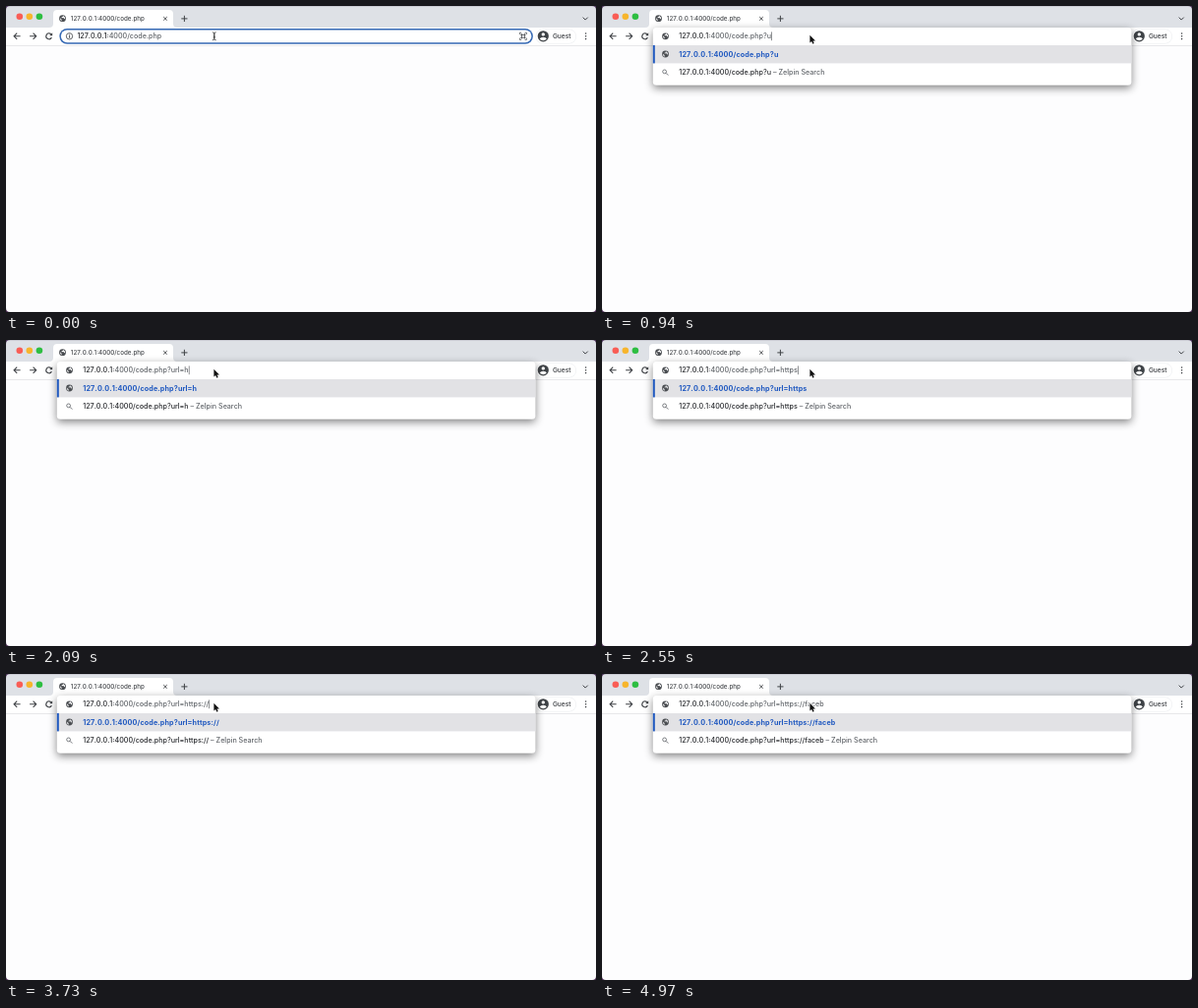
Recreate the animation shown at these times as an HTML page with a canvas. Size 600 by 312 pixels, loop 5 s.

```html
<!DOCTYPE html>
<html lang="en">
<head>
<meta charset="utf-8">
<title>Address bar typing</title>
<style>
html, body { margin: 0; width: 100%; height: 100%; overflow: hidden; background: #fdfdfe; }
canvas { display: block; width: 600px; height: 312px; }
</style>
</head>
<body>
<canvas id="stage"></canvas>
<script>
const canvas = document.getElementById('stage');
const ratio = window.devicePixelRatio || 1;
canvas.width = 600 * ratio;
canvas.height = 312 * ratio;
const ctx = canvas.getContext('2d');
ctx.fontKerning = 'none';

const LOOP = 5000;
const HOST = '127.0.0.1';
const PATH = ':4000/code.php';
const TYPED = '?url=https://faceb';
const KEYS = [650, 880, 1200, 1400, 1750, 1930, 2110, 2280, 2390, 2490, 2960,
  3450, 3610, 3880, 3970, 4060, 4200, 4340];
const INK = '#3f4246', DARK = '#26282c', GREY = '#5f6368', BLUE = '#2059c0';

function font(size, weight = 500, spacing = 0) {
  ctx.font = `${weight} ${size}px Inter, Roboto, sans-serif`;
  ctx.letterSpacing = spacing + 'px';
}

// Draws a run of text and returns the x where it ends.
function text(str, x, y, color) {
  ctx.fillStyle = color;
  ctx.fillText(str, x, y);
  return x + ctx.measureText(str).width;
}

function rect(x, y, w, h, color) {
  ctx.fillStyle = color;
  ctx.fillRect(x, y, w, h);
}

function round(x, y, w, h, r, color) {
  ctx.beginPath();
  ctx.roundRect(x, y, w, h, r);
  ctx.fillStyle = color;
  ctx.fill();
}

function dot(x, y, r, color) {
  ctx.beginPath();
  ctx.arc(x, y, r, 0, 7);
  ctx.fillStyle = color;
  ctx.fill();
}

function ring(x, y, r, color, width, from = 0, to = Math.PI * 2) {
  ctx.beginPath();
  ctx.arc(x, y, r, from, to);
  ctx.strokeStyle = color;
  ctx.lineWidth = width;
  ctx.stroke();
}

function line(d, color, width) {
  ctx.strokeStyle = color;
  ctx.lineWidth = width;
  ctx.stroke(new Path2D(d));
}

function shape(d, color) {
  ctx.fillStyle = color;
  ctx.fill(new Path2D(d));
}

function globe(x, y, hole) {
  dot(x, y, 3.4, '#4b4e52');
  ctx.save();
  ctx.translate(x, y);
  shape('M-2.7 -.6L-1 1L-.6 2.7Q-2.7 2.1 -2.7 -.6Z', hole);
  shape('M.3 -2.7Q1.7 -2.4 2.3 -1.3L2.6 .6L1.6 .3L1 -.7L-.9 -.5L-.8 -1.6L.4 -1.8Z', hole);
  ctx.restore();
}

function tabStrip() {
  rect(0, 0, 600, 22, '#dee1e6');
  rect(0, 0, 600, 1, '#cfd0d8');
  dot(13.8, 10.8, 3.3, '#f95d55');
  dot(23.8, 10.8, 3.3, '#f7b52c');
  dot(33.9, 10.8, 3.3, '#2dbe41');
  shape('M44 22Q48 22 48 18V8Q48 4 52 4H166Q170 4 170 8V18Q170 22 174 22Z', '#fff');
  globe(57.5, 12.7, '#fff');
  font(6.25);
  text(HOST + PATH, 65.8, 15, '#45484c');
  line('M160.2 11L163.8 14.6M163.8 11L160.2 14.6', INK, 0.9);
  line('M181.4 9.8V16M178.3 12.9H184.5', INK, 1);
  line('M586.7 11.6L589.2 14.1L591.7 11.6', INK, 1);
}

function toolbar() {
  rect(0, 22, 600, 18, '#fff');
  rect(0, 40, 600, 0.7, '#dedfe2');
  line('M14.6 30.8H8.2M11.2 27.7L8.1 30.8L11.2 33.9', INK, 1.1);
  line('M24.1 30.8H30.6M27.6 27.7L30.7 30.8L27.6 33.9', INK, 1.1);
  ring(43.7, 30.8, 2.9, INK, 1.1, 0.4, 5.5);
  shape('M47.2 27.3V30.3H44.2Z', INK);

  round(538.5, 23.5, 41.5, 15, 7.5, '#eaecef');
  round(539, 24, 40.5, 14, 7, '#fff');
  dot(546.3, 30.8, 5.6, '#3f4347');
  dot(546.3, 28.9, 1.7, '#fff');
  shape('M542.8 33.6Q543.4 31.7 546.3 31.7Q549.2 31.7 549.8 33.6Q548.5 35.2 546.3 35.2Q544.1 35.2 542.8 33.6Z', '#fff');
  font(6.6);
  text('Guest', 555.9, 33.2, '#393c40');
  for (const y of [28, 30.8, 33.6]) dot(589.6, y, 0.8, INK);
}

function windowCorners() {
  shape('M0 0H4Q0 0 0 4Z', '#4b3159');
  shape('M600 0H596Q600 0 600 4Z', '#4b3159');
  shape('M0 312V308Q0 312 4 312Z', '#4c2d55');
  shape('M600 312V308Q600 312 596 312Z', '#4c2d55');
}

function address(x) {
  const mid = text(HOST, x, 33.4, DARK);
  return text(PATH, mid, 33.4, GREY);
}

function caretAt(x) {
  rect(x, 26.4, 0.6, 8.8, '#44474b');
}

function idleBar(t) {
  round(54.3, 22.9, 481.6, 15.8, 7.9, '#3468b4');
  round(55.8, 24.4, 478.6, 12.8, 6.4, '#fff');
  ring(64.5, 30.8, 3.2, INK, 0.8);
  rect(64.1, 30.2, 0.9, 2.5, INK);
  rect(64.1, 28.7, 0.9, 0.9, INK);
  line('M522.4 29V27.2H524.2M527.6 27.2H529.4V29M529.4 32.6V34.4H527.6M524.2 34.4H522.4V32.6', INK, 0.7);
  line('M524.4 28.2V33.4M527.4 28.2V33.4M523.3 29.4H528.5M523.3 32.2H528.5', INK, 0.8);
  font(7.15);
  const end = address(72.4);
  if (t > 130) caretAt(end + 0.2);
  line('M209.9 26.8Q211.8 26.8 211.8 28.2V33.4Q211.8 34.8 209.9 34.8M213.7 26.8Q211.8 26.8 211.8 28.2V33.4Q211.8 34.8 213.7 34.8M210.9 31.8H212.7', '#222', 0.7);
}

function dropdown(t, count) {
  ctx.save();
  ctx.shadowColor = 'rgba(0,0,0,.48)';
  ctx.shadowBlur = 9 * ratio;
  ctx.shadowOffsetY = 3 * ratio;
  round(51.8, 22, 486.6, 58.8, 3.5, '#fff');
  ctx.restore();
  rect(51.8, 40, 486.6, 18.4, '#e2e2e5');
  rect(51.8, 40, 2, 18.4, BLUE);
  globe(64.5, 30.8, '#fff');
  globe(64.5, 49, '#e2e2e5');
  ring(63.6, 66.9, 1.9, GREY, 0.8);
  line('M65 68.3L67.3 70.6', GREY, 0.9);

  const typed = TYPED.slice(0, count);
  const full = HOST + PATH + typed;
  font(7.15);
  const end = text(typed, address(78.2), 33.4, GREY);
  const since = t - KEYS[count - 1];
  if (since % 1000 < 500) caretAt(end + 0.2);
  const mid = text(full, 78.2, 70.2, DARK);
  text(' – Zelpin Search', mid, 70.2, GREY);
  font(7.2, 700, 0.12);
  text(full, 78.2, 51.6, BLUE);

  const arrow = new Path2D('M211.4 29.7V37.5L213.2 36L214.4 38.7L215.7 38.1L214.6 35.5H217Z');
  ctx.strokeStyle = '#fff';
  ctx.lineWidth = 1.2;
  ctx.stroke(arrow);
  ctx.fillStyle = '#111';
  ctx.fill(arrow);
}

function draw(t) {
  ctx.setTransform(ratio, 0, 0, ratio, 0, 0);
  rect(0, 0, 600, 312, '#fdfdfe');
  tabStrip();
  toolbar();
  const count = KEYS.filter(k => k <= t).length;
  if (count) dropdown(t, count);
  else idleBar(t);
  windowCorners();
}

const start = performance.now();
function frame() {
  draw((performance.now() - start) % LOOP);
  requestAnimationFrame(frame);
}
frame();
</script>
</body>
</html>
```
